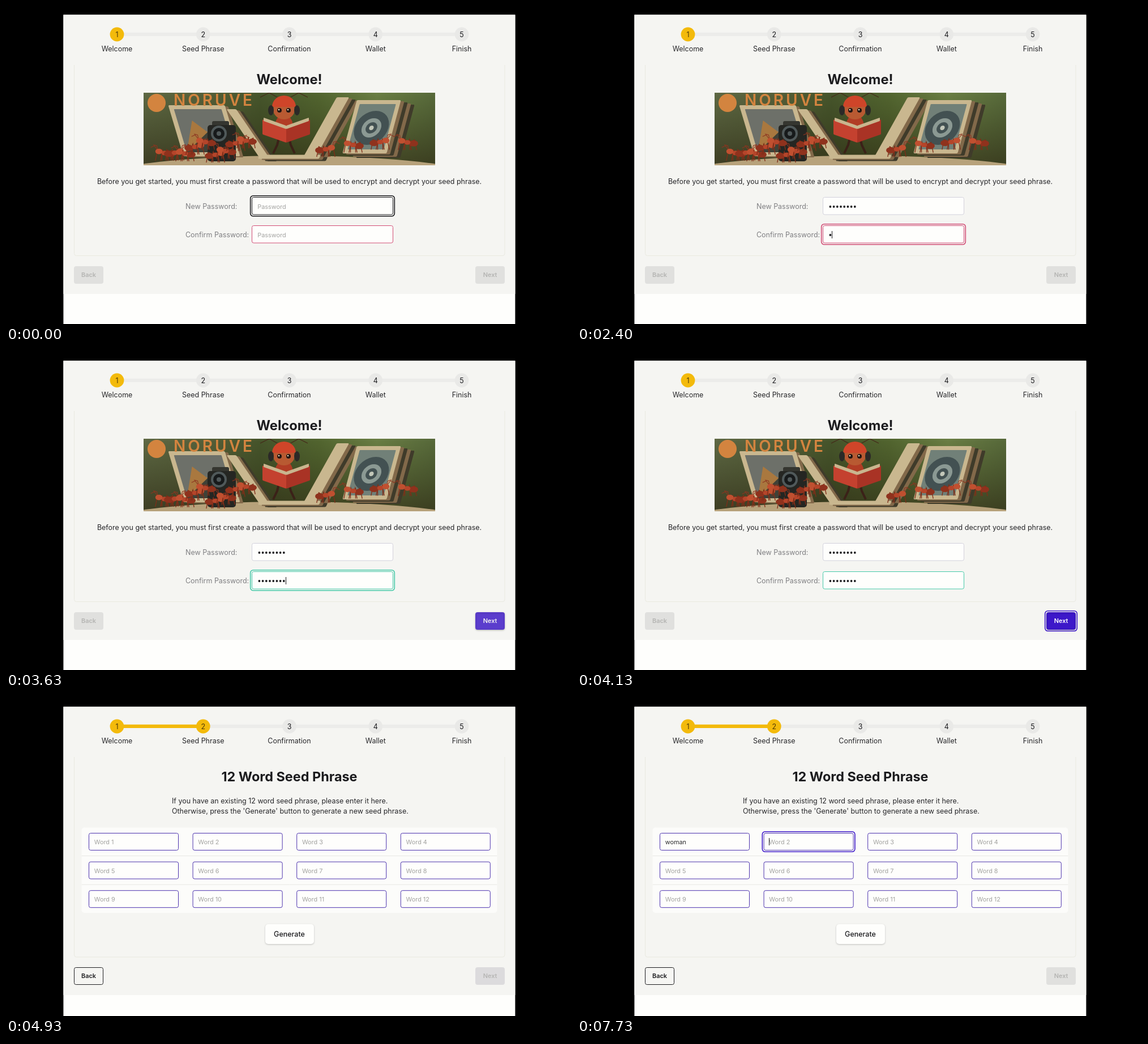
Recreate the animation shown at these times as an HTML page with a canvas. Size 998 px wide and 561 px high, loop 8000 ms.

```html
<!DOCTYPE html>
<html lang="en">
<head>
<meta charset="utf-8">
<title>Wallet setup</title>
<style>
html, body { margin: 0; width: 100%; height: 100%; overflow: hidden; background: #000; }
canvas { display: block; }
</style>
</head>
<body>
<canvas id="stage" width="998" height="561"></canvas>
<script>
const LOOP = 8000, MID = 500.5;
const BODY = 12.48, SMALL = 10.9;
const c = document.getElementById('stage').getContext('2d');
const INK = '#1b1b1e', GOLD = '#f3ba0b', PURPLE = '#3d18c9', PINK = '#d24d76', TEAL = '#45c9a8';
const PAGE = '#f5f5f2', WHITE = '#fefefc', HINT = '#a3a3a1', MUTED = '#7f7f82';

// Keys are struck at an even pace from a start time.
const typed = (t, start, pace, max) => Math.max(0, Math.min(max, 1 + Math.floor((t - start) / pace)));
const between = (t, a, b) => t >= a && t < b;
const easeOut = (t, start, span) => 1 - (1 - Math.min(1, Math.max(0, (t - start) / span))) ** 2;
const mix = (a, b, p) => `rgb(${a.map((v, i) => Math.round(v + (b[i] - v) * p))})`;
const random = n => Math.abs(Math.sin(n * 91.7) * 437.5) % 1;

function text(s, x, y, size, color, weight = 400, align = 'left') {
  c.font = `${weight} ${size}px Inter, sans-serif`;
  c.textAlign = align;
  c.fillStyle = color;
  c.fillText(s, x, y);
}

function box(x, y, w, h, r, fill, stroke, width = 1) {
  c.beginPath();
  c.roundRect(x, y, w, h, r);
  if (fill) { c.fillStyle = fill; c.fill(); }
  if (stroke) { c.strokeStyle = stroke; c.lineWidth = width; c.stroke(); }
}

function oval(fill, x, y, rx, ry = rx, from = 0) {
  c.beginPath();
  c.ellipse(x, y, rx, ry, 0, from, Math.PI * 2);
  c.fillStyle = fill;
  c.fill();
}

function line(color, width, ...p) {
  c.beginPath();
  for (let i = 0; i < p.length; i += 2) c.lineTo(p[i], p[i + 1]);
  c.strokeStyle = color;
  c.lineWidth = width;
  c.stroke();
}

function placed(draw, a, b, d, e, x, y) {
  c.save();
  c.transform(a, b, d, e, x, y);
  draw();
  c.restore();
}

function shadowed(draw) {
  c.save();
  c.shadowColor = 'rgba(0,0,0,.22)';
  c.shadowBlur = 3;
  c.shadowOffsetY = 1;
  draw();
  c.restore();
}

const ring = (x, y, w, h, color) => box(x - 2.3, y - 2.3, w + 4.6, h + 4.6, 5, null, color, 1.6);
const caret = (x, y) => { c.fillStyle = INK; c.fillRect(x, y, 1, 13); };

function gradient(x1, y1, ...stops) {
  const g = c.createLinearGradient(243, 153, x1, y1);
  stops.forEach((s, i) => g.addColorStop(i / (stops.length - 1), s));
  c.fillStyle = g;
  c.fillRect(243, 153, 515, 128);
}

// A leaning stack of sheets; `inside` paints on the top one, around its centre.
function sheets(x, y, w, h, lean, count, inside = () => {}) {
  for (let i = count; i >= 0; i--) placed(() => {
    box(-w / 2, -h / 2, w, h, 2, i ? (i % 2 ? '#82694a' : '#3f3b2a') : '#c9b78f');
    if (!i) inside();
  }, 1, 0, lean, 1, x + i * 6, y + i * 2);
}

function ant(x, y, dir) {
  placed(() => {
    for (const k of [-1, 0, 1])
      for (const side of [-5, 5]) line('#7f2e19', 1.5, k * 3, 0, k * 9 + side, -6, k * 13 + side, 14);
    for (const k of [0, 5]) line('#8d3520', 1.2, 13, -6, 20 - k, -15, 27 - k, -12 - k);
    oval('#8f321d', -12, 1, 9, 6);
    oval('#b5452a', 0, -1, 6, 4.5);
    oval('#c05030', 11, -4, 7, 5.5);
  }, dir * 0.9, 0, 0, 0.9, x, y);
}

function reader() {
  oval('#b13d25', 0, 32, 16, 22);
  for (const side of [-1, 1]) {
    line('#3b2118', 4, side * 8, 48, side * 12, 64, side * 19, 79);
    line('#452719', 1.2, side * 10, -19, side * 26, -28, side * 42, -20);
  }
  oval('#b85a32', 0, 2, 19, 17);
  oval('#cf4529', 0, -3, 21, 20, Math.PI);
  for (const side of [-1, 1]) {
    oval('#2b2927', side * 23, 3, 5, 9);
    oval('#241713', side * 8, 3, 4);
    oval('#efe1c9', side * 8 - 1, 2, 1.3);
    placed(() => {
      box(0, 0, 42, 26, 1, side < 0 ? '#c4412f' : '#a93325');
      box(0, -4, 40, 6, 1, '#c9b58e');
    }, side, -0.35, 0, 1, 4, 34);
  }
}

function banner() {
  c.save();
  c.beginPath();
  c.rect(243, 153, 515, 128);
  c.clip();
  gradient(758, 153, '#5e6844', '#56603a', '#46552b', '#52652f', '#6a7e44', '#57693a');
  gradient(243, 281, 'rgba(40,44,18,0)', 'rgba(44,38,18,.65)');
  oval('#b7a27b', MID, 306, 340, 42);
  sheets(350, 220, 100, 90, 0.3, 1, () => {
    box(-42, -38, 84, 76, 1, '#6d7069');
    for (const k of [0, 1]) {
      c.beginPath();
      c.moveTo(-42, 38);
      c.lineTo(-16 + k * 38, -18 + k * 8);
      c.lineTo(42, 38);
      c.fillStyle = k ? '#3f4137' : '#a9783f';
      c.fill();
    }
  });
  box(364, 203, 30, 12, 3, '#353630');
  box(356, 210, 50, 64, 5, '#252622');
  for (const r of [14, 10, 4]) oval(r === 10 ? '#171a1b' : '#50595a', 376, 225, r);
  sheets(428, 226, 17, 88, 0.68, 2);
  sheets(566, 213, 22, 104, -0.56, 3);
  sheets(MID, 266, 108, 7, -0.4, 2);
  sheets(646, 213, 78, 94, -0.27, 4, () => {
    box(-32, -40, 64, 80, 1, '#718078');
    for (const r of [30, 17, 10, 4]) oval(r === 17 ? '#8b9993' : r === 4 ? '#c3c7b9' : '#435152', 0, 2, r);
  });
  placed(reader, 1, 0, 0, 1, 491, 181);
  for (let i = 0; i < 13; i++) {
    const x = i < 9 ? 280 + 18 * i : 565 + 48 * (i - 9);
    ant(x, (i < 9 ? 238 : 226) + 28 * random(i + 1), i % 2 ? 1 : -1);
  }
  oval('#d3843f', 266, 171, 16);
  c.letterSpacing = '4px';
  text('NORUVE', 296, 175.5, 28, '#d3843f', 600);
  c.restore();
}

function steps(done) {
  const names = ['Welcome', 'Seed Phrase', 'Confirmation', 'Wallet', 'Finish'];
  const gap = 152.25, at = i => 196 + gap * i;
  for (let i = 1; i < names.length; i++) {
    c.fillStyle = i < done ? GOLD : '#ececea';
    c.fillRect(at(i - 1), 46.8, gap, 6.2);
  }
  names.forEach((name, i) => {
    oval(i < done ? GOLD : '#e9e9e7', at(i), 50, 12.4);
    text(i + 1, at(i), 54.5, BODY, i < done ? '#4f3a08' : INK, 400, 'center');
    text(name, at(i), 79.5, BODY, '#27272a', 400, 'center');
  });
}

function frame(cardEnd, pageEnd) {
  c.fillStyle = '#000';
  c.fillRect(0, 0, 998, 561);
  c.fillStyle = WHITE;
  c.fillRect(101.4, 15.5, 798, 546);
  c.fillStyle = PAGE;
  c.fillRect(101.4, 15.5, 798, pageEnd - 15.5);
  c.save();
  c.beginPath();
  c.rect(101, 104, 798, 440);
  c.clip();
  box(120.5, 90, 760.5, cardEnd - 90, 4, null, '#e9e9e0');
  c.restore();
}

// on runs from 0, disabled grey, to 1, enabled
function button(label, x, y, on, fill, edge, ink) {
  const grey = [224, 224, 222];
  const draw = () => box(x + 0.5, y + 0.5, 51, 30, 3, mix(grey, fill, on), mix(grey, edge, on));
  on > 0.5 && fill === edge ? shadowed(draw) : draw();
  text(label, x + 26, y + 19.4, SMALL, mix([180, 180, 178], ink, on), 600, 'center');
}

function buttons(y, back, next) {
  const dark = [27, 27, 30], purple = [61, 24, 201];
  button('Back', 120, y, back, [246, 246, 243], dark, dark);
  button('Next', 829, y, next, purple, purple, [255, 255, 255]);
}

function password(y, count, border, focus, showCaret) {
  box(434.5, y + 0.5, 249, 30.5, 3, WHITE, border);
  if (focus) ring(434, y, 250, 31.5, border);
  if (!count) text('Password', 444.3, y + 20.5, SMALL, HINT);
  for (let i = 0; i < count; i++) oval(INK, 447.4 + 6.2 * i, y + 17, 1.9);
  if (showCaret) caret(Math.round(444 + 6.2 * count), y + 10);
}

function welcomePage(t) {
  const confirming = between(t, 2070, 4130);
  frame(440.5, 508);
  steps(1);
  text('Welcome!', MID, 138, 23.7, INK, 700, 'center');
  banner();
  text('Before you get started, you must first create a password that will be used to encrypt and decrypt your seed phrase.',
    MID, 314, BODY, '#27272a', 400, 'center');
  text('New Password:', 317, 357.6, BODY, MUTED);
  text('Confirm Password:', 317, 407.6, BODY, MUTED);
  password(337, typed(t, 830, 149, 8), t < 2070 ? INK : '#d2d1dc', t < 2070, between(t, 270, 2070));
  password(387, typed(t, 2400, 149, 8), t < 3530 ? PINK : TEAL, confirming, confirming);
  buttons(459, 0, easeOut(t, 3500, 230));
  if (t >= 4130) ring(829, 459, 52, 31, PURPLE);
}

function seedPage(t) {
  const word = 'woman'.slice(0, typed(t, 6300, 133, 5));
  const focus = t < 5570 ? -1 : t < 7730 ? 0 : 1;
  const blinkOff = between(t, 6200, 6300) || between(t, 7430, 7730);
  frame(457, 524);
  steps(2);
  text('12 Word Seed Phrase', MID, 147.3, 23.4, INK, 700, 'center');
  text('If you have an existing 12 word seed phrase, please enter it here.', 293, 185.5, BODY, '#27272a');
  text("Otherwise, press the 'Generate' button to generate a new seed phrase.", 293, 204.2, BODY, '#27272a');
  box(133.5, 228.5, 734, 150.5, 5, '#fcfcfa');
  for (const y of [278.5, 329.2]) line('#e8e8e4', 1, 133.5, y, 867.5, y);

  for (let i = 0; i < 12; i++) {
    const x = 146 + 183.6 * (i % 4), y = 238 + 50.6 * Math.floor(i / 4);
    const value = i ? '' : word;
    box(x + 0.5, y + 0.5, 158, 30, 3, WHITE, '#4c32ae');
    text(value || `Word ${i + 1}`, x + 9.7, y + 20.2, SMALL, value ? '#29292c' : HINT);
    if (i !== focus) continue;
    ring(x, y, 159, 31, PURPLE);
    if (!blinkOff) caret(Math.round(x + 9.7 + (value && c.measureText(value).width)), y + 9);
  }

  shadowed(() => box(458, 399, 86, 35, 5, WHITE));
  text('Generate', MID, 421.3, BODY, INK, 500, 'center');
  const swap = easeOut(t, 4730, 240);
  buttons(475, swap, 1 - swap);
}

function draw() {
  const t = performance.now() % LOOP;
  (t < 4730 ? welcomePage : seedPage)(t);
  requestAnimationFrame(draw);
}
draw();
</script>
</body>
</html>
```
